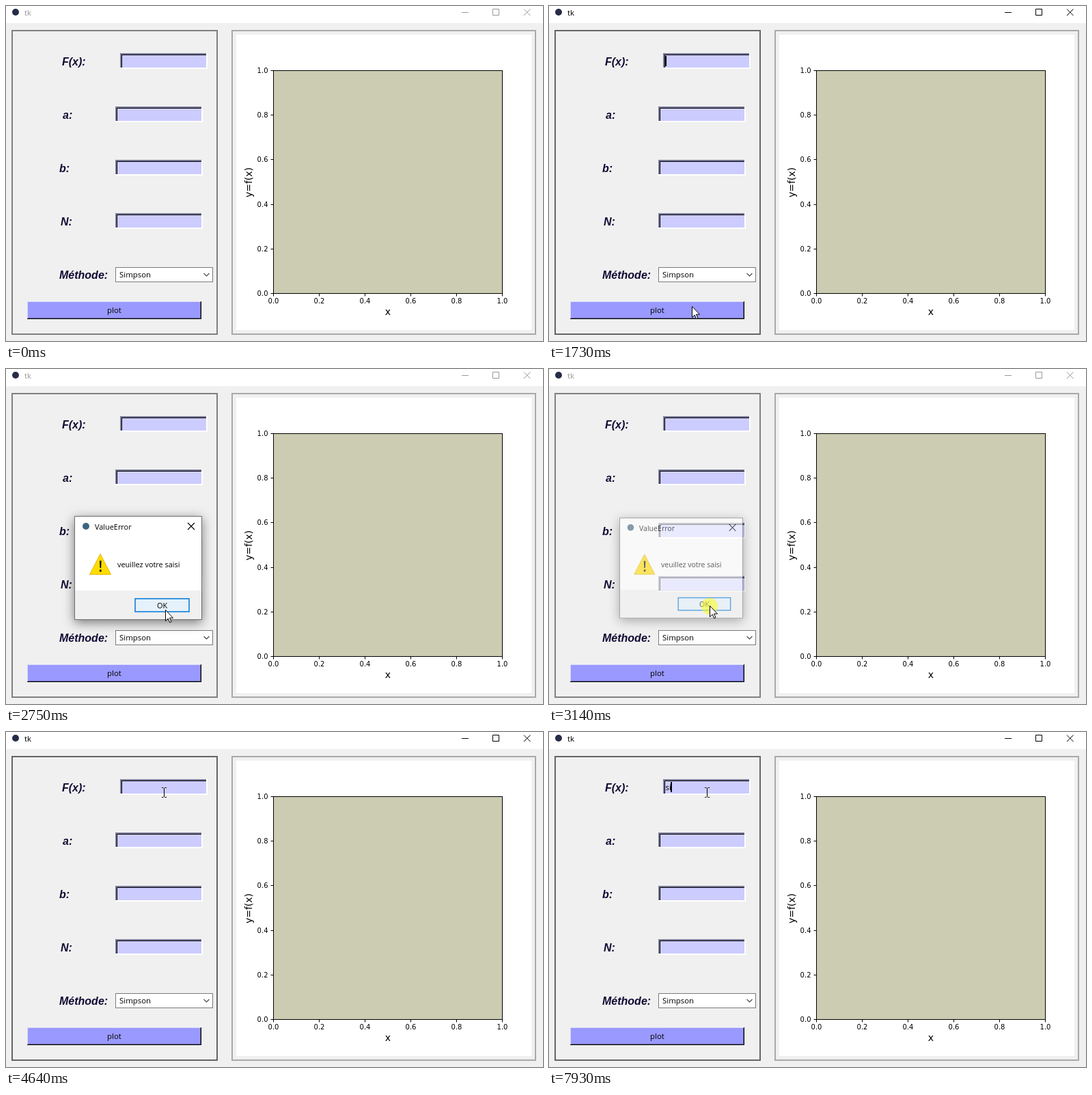
Recreate the animation shown at these times as an HTML page. Size 786 by 490 pixels, loop 8 s.

```html
<!DOCTYPE html>
<html lang="fr">
<head>
<meta charset="utf-8">
<title>tk</title>
<style>
html, body { margin: 0; width: 100%; height: 100%; overflow: hidden; background: #f0f0f0; }
svg { display: block; }
text { font: 11.4px "Open Sans", "Noto Sans", sans-serif; white-space: pre; }
.label text { font: italic bold 16px "Liberation Sans", Arial, sans-serif; fill: #110a33; }
.plot text { font: 10px "DejaVu Sans", sans-serif; }
.plot .axis { font-size: 14px; }
.mid { text-anchor: middle; }
.end { text-anchor: end; }
#dialog text { font-size: 10.9px; }
#box { filter: drop-shadow(0 4px 8px rgba(0, 0, 0, .5)); }
</style>
</head>
<body>
<svg width="786" height="490" viewBox="0 0 786 490">
  <rect width="786" height="490" fill="#f0f0f0"/>
  <rect width="786" height="25" fill="#fff"/>
  <circle cx="14" cy="9" r="5" fill="#262c48"/>
  <text id="title" x="27" y="14">tk</text>
  <path id="controls" d="M667 9.5h10M712.5 4.5h9v9h-9zM758 4.5l9.5 9.5M767.5 4.5l-9.5 9.5" fill="none"/>

  <rect id="panel" x="9" y="36" width="300" height="444" fill="none" stroke-width="2"/>
  <g class="label">
    <text x="82" y="87">F(x):</text>
    <text x="83" y="165">a:</text>
    <text x="78" y="243">b:</text>
    <text x="80" y="321">N:</text>
    <text x="78" y="399">Méthode:</text>
  </g>
  <g id="entries"></g>
  <text id="typed" x="170.5" y="85"></text>
  <rect id="caret" y="73" width="2" height="15"/>

  <rect x="160.5" y="382.5" width="142" height="21" fill="#fff" stroke="#7a7a7a"/>
  <text x="166" y="397">Simpson</text>
  <path d="M289.5 391l4 4 4-4" fill="none" stroke="#444" stroke-width="1.1"/>

  <g id="raised">
    <rect x="31" y="432" width="255" height="26"/>
    <rect x="31" y="432" width="254" height="25" fill="#d8d8ff"/>
    <rect x="32" y="433" width="253" height="24" fill="#5c5c99"/>
    <rect x="32" y="433" width="252" height="23" fill="#99f"/>
    <text class="mid" x="158.5" y="449">plot</text>
  </g>
  <g id="sunken">
    <rect x="31" y="432" width="255" height="26" fill="#fff"/>
    <rect x="31" y="432" width="254" height="25" fill="#a0a0a0"/>
    <rect x="32" y="433" width="253" height="24" fill="#696969"/>
    <rect x="33" y="434" width="252" height="23" fill="#f0f0f0"/>
    <text class="mid" x="159.5" y="450">plot</text>
  </g>

  <rect x="331" y="36" width="444" height="444" fill="none" stroke="#a9a9a9" stroke-width="2"/>
  <rect x="337" y="42" width="432" height="432" fill="#fff"/>
  <g class="plot">
    <rect x="391.5" y="94.5" width="335" height="326" fill="#ccccb3" stroke="#000"/>
    <g id="ticks"></g>
    <text class="axis mid" x="559" y="452">x</text>
    <text class="axis mid" transform="translate(360 258) rotate(-90)">y=f(x)</text>
  </g>

  <g id="dialog">
    <rect id="box" x="100" y="215" width="187" height="152" fill="#6e6e6e"/>
    <rect x="101" y="216" width="185" height="150" fill="#fff"/>
    <rect x="101" y="324" width="185" height="42" fill="#f0f0f0"/>
    <circle cx="117" cy="230" r="5" fill="#3f6480"/>
    <text x="130" y="235">ValueError</text>
    <path d="M266 225l10 10M276 225l-10 10" stroke="#000" stroke-width="1.1"/>
    <path d="M138 270.5l15.5 30h-31z" fill="#ffdc00" stroke="#e8b800" stroke-linejoin="round"/>
    <path d="M137 280.5h2.6l-.5 10.5h-1.6zM137 293.5h2.6v3h-2.6z"/>
    <text x="163" y="290">veuillez votre saisi</text>
    <rect id="ok" x="189" y="336" width="79" height="19" stroke="#0078d7"/>
    <text class="mid" x="228.5" y="350">OK</text>
  </g>

  <circle id="click" r="12" fill="#ff0" opacity=".5"/>
  <path id="arrow" d="M.5 .5v16l3.7-3.5 2.5 5.6 2.3-1-2.5-5.5h5z" fill="#fff" stroke="#000"/>
  <path id="beam" d="M-3 -6.5h2.5M1.5 -6.5h2.5M.5 -6v13M-3 7.5h2.5M1.5 7.5h2.5" fill="none" stroke="#000"/>
</svg>
<script>
const $ = id => document.getElementById(id);
const set = (id, attrs) => {
  for (const name in attrs) $(id).setAttribute(name, attrs[name]);
};
const show = (id, on) => set(id, { visibility: on ? "visible" : "hidden" });
const rect = (x, y, w, h, fill) =>
  `<rect x="${x}" y="${y}" width="${w}" height="${h}" fill="${fill}"/>`;

const entry = (x, y) =>
  rect(x, y, 128, 23, "#fff") + rect(x, y, 126, 21, "#7a7a99") +
  rect(x + 2, y + 2, 124, 19, "#000") + rect(x + 3, y + 3, 123, 18, "#ccf");
$("entries").innerHTML =
  entry(167, 69) + entry(160, 147) + entry(160, 225) + entry(160, 303);

for (let i = 0; i < 6; i++) {
  const x = Math.round(391 + i * 66.96), y = Math.round(420 - i * 65.2);
  const value = (i / 5).toFixed(1);
  $("ticks").innerHTML +=
    `<path d="M${x + .5} 421v3.5M391 ${y + .5}h-3.5" stroke="#000"/>
     <text class="mid" x="${x + .5}" y="435">${value}</text>
     <text class="end" x="383.5" y="${y + 4}">${value}</text>`;
}

// Pointer runs: first and last step time, then the place at each step.
const runs = [
  [260, 730, [[383, 431], [320, 433], [264, 436], [228, 438], [211, 439], [206, 438], [209, 439]]],
  [2280, 2910, [[210, 435], [213, 423], [219, 404], [224, 384], [229, 367], [232, 357], [233, 352], [234, 348], [235, 346]]],
  [3440, 3840, [[235, 190], [234, 91], [233, 90], [232, 89], [231, 88], [231, 88]]]
];
const clicks = [[1510, 1670, 209, 440], [3060, 3210, 235, 347], [4010, 4240, 229, 87]];
// Entry states: start, text, caret x (0 = caret off).
const typing = [
  [0, "", 0], [1510, "", 170], [1750, "", 0], [3210, "", 170], [3840, "", 0],
  [4010, "", 170], [4640, "", 0], [4950, "S", 176], [5590, "S", 0], [5880, "S", 176],
  [6470, "S", 0], [6770, "", 170], [7400, "", 0], [7700, "s", 175], [7930, "si", 178]
];

const within = (t, a, b) => t >= a && t < b;
const latest = (list, t) => list.filter(item => item[0] <= t).pop();

function stepOf(t, start, end, count) {
  const k = Math.floor((t - start + 5) / (end - start) * (count - 1));
  return Math.min(k, count - 1);
}

function pointer(t) {
  const run = latest(runs, t);
  if (!run) return null;
  const [start, end, places] = run;
  return places[stepOf(t, start, end, places.length)];
}

function dialogAlpha(t) {
  if (!within(t, 1750, 3290)) return 0;
  if (t >= 3140) return t < 3210 ? .6 : .2;
  const left = 1 - (stepOf(t, 1750, 1980, 4) + 1) / 4;
  return 1 - left * left;
}

function draw(t) {
  const active = within(t, 1510, 1750) || t >= 3210;
  set("title", { fill: active ? "#000" : "#999" });
  set("controls", { stroke: active ? "#000" : "#999" });
  set("panel", { stroke: active ? "#646464" : "#808080" });

  const pressed = within(t, 1510, 1670);
  show("raised", !pressed);
  show("sunken", pressed);

  const [, text, caret] = latest(typing, t);
  $("typed").textContent = text;
  set("caret", { x: caret });
  show("caret", caret);

  const place = pointer(t);
  const alpha = dialogAlpha(t), scale = .92 + .08 * alpha;
  const hover = place && place[1] < 356;
  show("dialog", alpha);
  set("dialog", {
    opacity: alpha,
    transform: `translate(193.5 291) scale(${scale}) translate(-193.5 -291)`
  });
  set("ok", { fill: hover ? "#e5f1fb" : "#e1e1e1", "stroke-width": hover ? 1.5 : 2 });

  const click = clicks.find(([start, end]) => within(t, start, end));
  show("click", click);
  if (click) set("click", { cx: click[2], cy: click[3] });

  const typingArea = place && place[1] < 92;
  show("arrow", place && !typingArea);
  show("beam", typingArea);
  if (place) set(typingArea ? "beam" : "arrow", { transform: `translate(${place})` });
}

function tick() {
  draw(performance.now() % 8000);
  requestAnimationFrame(tick);
}
tick();
</script>
</body>
</html>
```
